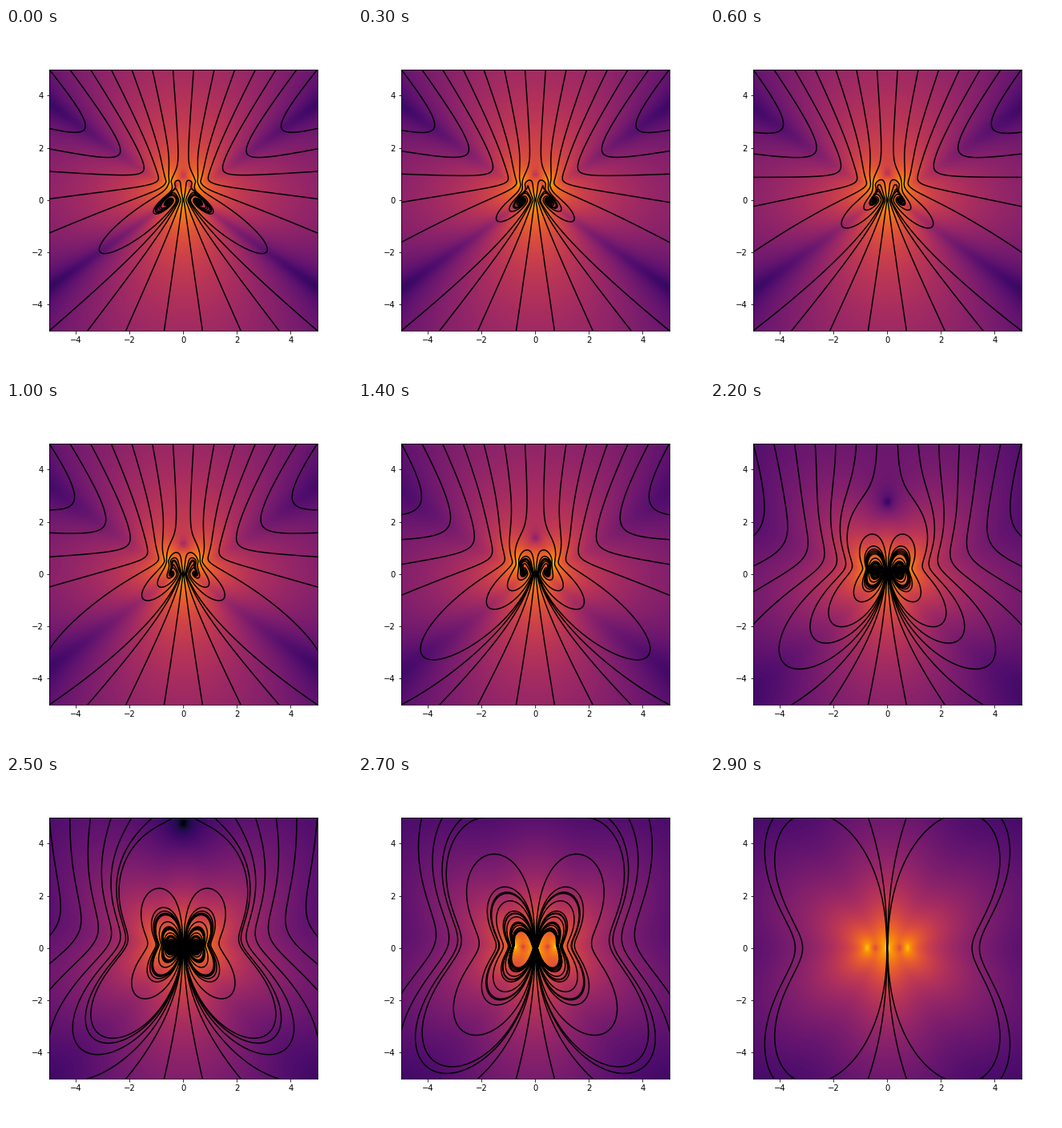
A matplotlib script that plays this animation: 432x432 px, repeating every 3 s.

```python
import matplotlib.pyplot as plt
import numpy as np
from matplotlib.animation import FuncAnimation

FRAMES, INTERVAL = 30, 100
HALF = 5.0          # half width of the domain
N = 100             # grid points per side
STEP, LENGTH = 0.02, 40.0


def stokeslet(x, y):
    """Flow of a unit point force along +y."""
    r2 = x**2 + y**2
    r3 = r2 * np.sqrt(r2)
    return x * y / r3, (r2 + y**2) / r3


def arm(s):
    """Place of the right side force; s runs from 1 down to 0."""
    return 0.75 - 0.139 * (1 - np.cos(2.5 * s)), 0.75 * np.sin(1.15 * s)


def swimmer(x, y, s):
    """A central force balanced by two half forces at the sides."""
    u, v = stokeslet(x, y)
    ax_, ay_ = arm(s)
    for side in (-1, 1):
        du, dv = stokeslet(x - side * ax_, y - ay_)
        u, v = u - du / 2, v - dv / 2
    return u, v


axis = np.linspace(-HALF, HALF, N)
h = axis[1] - axis[0]
X, Y = np.meshgrid(axis, axis)
phases = 1 - np.arange(FRAMES) / (FRAMES - 1)
flow = np.array([np.stack(swimmer(X, Y, s), axis=-1) for s in phases])
speed = np.log10(np.hypot(flow[..., 0], flow[..., 1]) + 1e-12)


def direction(p):
    """Unit flow vectors at p (frame, seed, xy), bilinear on the grid."""
    g = (np.nan_to_num(p) + HALF) / h
    cell = np.clip(g.astype(int), 0, N - 2)
    i, j = cell[..., 0], cell[..., 1]
    fx, fy = np.moveaxis(g - cell, -1, 0)[..., None]
    k = np.arange(FRAMES)[:, None]
    low = flow[k, j, i] * (1 - fx) + flow[k, j, i + 1] * fx
    high = flow[k, j + 1, i] * (1 - fx) + flow[k, j + 1, i + 1] * fx
    w = low * (1 - fy) + high * fy
    return w / (np.hypot(w[..., :1], w[..., 1:]) + 1e-12)


def trace(seeds):
    """Follow the flow forward from the seeds in all frames at once."""
    p = np.repeat(seeds[None], FRAMES, axis=0)
    path = [p]
    for _ in range(int(LENGTH / STEP)):
        middle = p + direction(p) * STEP / 2
        p = p + direction(middle) * STEP
        path.append(p)
        outside = np.abs(p).max(axis=-1, keepdims=True) > HALF
        p = np.where(outside, np.nan, p)
    path.append(np.full_like(p, np.nan))
    return np.array(path).transpose(1, 2, 0, 3)


bottom = [(x, -HALF) for x in np.linspace(-HALF, HALF, 8)[:4]]
top = [(x, HALF) for x in np.linspace(-HALF, HALF, 14)[:7]]
left = trace(np.array(bottom + top))
paths = np.concatenate([left, left * [-1, 1]], axis=1).reshape(FRAMES, -1, 2)

fig, ax = plt.subplots(figsize=(6, 6), dpi=72)
fig.subplots_adjust(left=0.125, right=0.9, bottom=0.125, top=0.88)
edge = HALF + h / 2
image = ax.imshow(speed[0], origin="lower", cmap="inferno", vmin=-3.9, vmax=2.1,
                  extent=(-edge, edge, -edge, edge), interpolation="bilinear",
                  aspect="auto")
lines, = ax.plot([], [], color="black", lw=1.5)
ax.set(xlim=(-HALF, HALF), ylim=(-HALF, HALF),
       xticks=range(-4, 5, 2), yticks=range(-4, 5, 2))


def update(n):
    image.set_data(speed[n])
    lines.set_data(paths[n, :, 0], paths[n, :, 1])
    return image, lines


anim = FuncAnimation(fig, update, frames=FRAMES, interval=INTERVAL,
                     repeat=True, repeat_delay=0)
plt.show()
```
